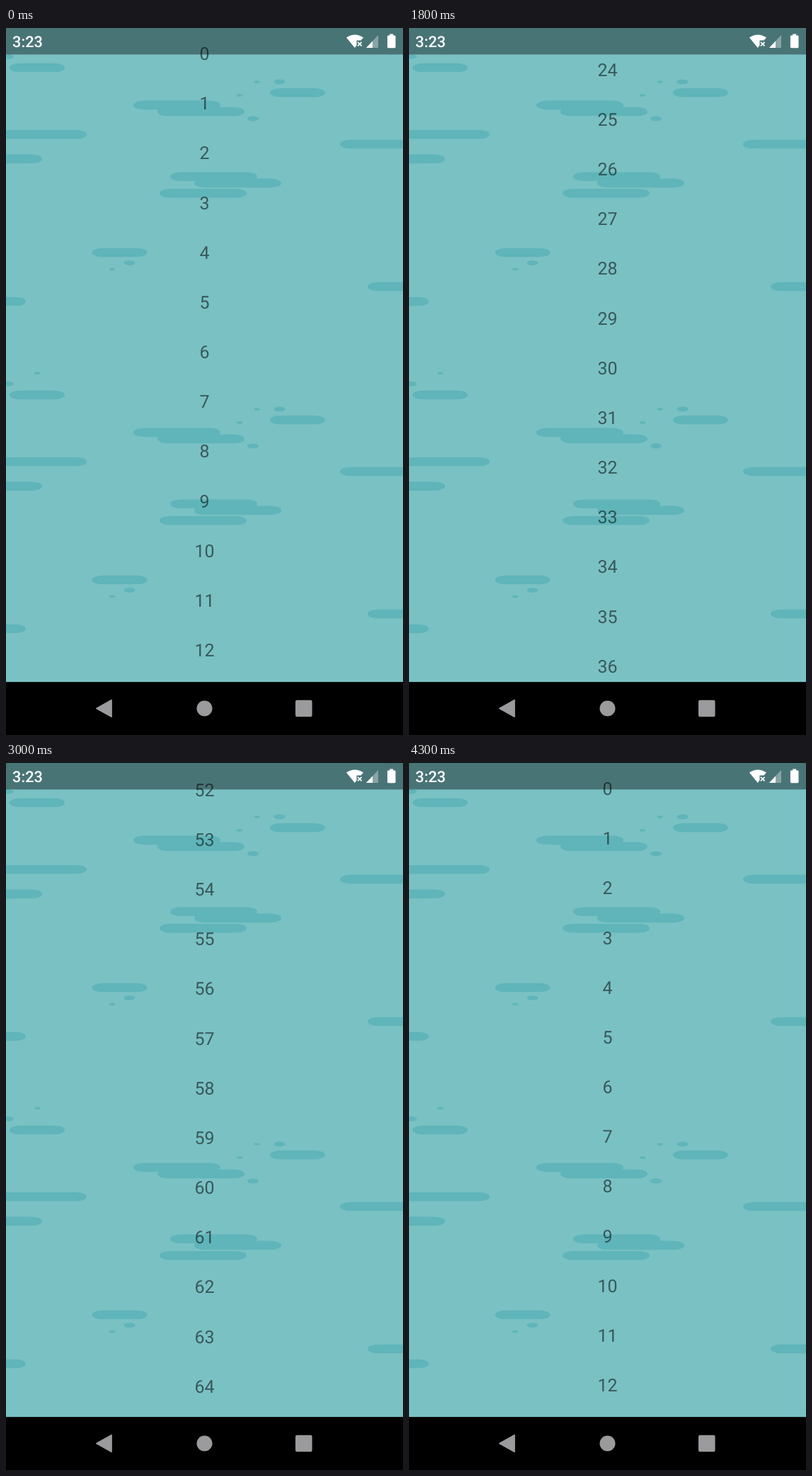
An HTML page for the animation above (4.6 s loop, 561 px wide and 998 px high).

```html
<!DOCTYPE html>
<html lang="en">
<head>
<meta charset="utf-8">
<title>Number list</title>
<style>
  html, body { margin: 0; width: 100%; height: 100%; overflow: hidden; background: #000; }
  svg { display: block; width: 100%; height: 100%; }
  text { font-family: Roboto, sans-serif; text-rendering: geometricPrecision; }
  #list { font-size: 25px; text-anchor: middle; fill: rgba(0, 0, 0, .54); }
</style>
</head>
<body>
<svg viewBox="0 0 561 998">
  <rect width="561" height="998" fill="#7ac1c4"/>
  <g id="tile" fill="#5fb5b9"></g>
  <use href="#tile" y="462"/>
  <g id="list"></g>

  <!-- status bar -->
  <rect width="561" height="37.4" fill="#000" opacity=".4"/>
  <g fill="#fff">
    <text x="9" y="27.3" font-size="21.8" font-weight="500">3:23</text>
    <path d="M481 13.5Q493 5.5 505 13.5L501.5 17.5H495.5V24.5L492.8 28Z"/>
    <path d="M497 19.8l5.6 5.6m0-5.6l-5.6 5.6" stroke="#fff" stroke-width="1.7"/>
    <path d="M526 10V28H509Z" opacity=".35"/>
    <path d="M518 18.5V28H509Z"/>
    <path d="M542.2 8.5h5v2h2q1.3 0 1.3 1.3v15q0 1.4-1.3 1.4h-9q-1.3 0-1.3-1.4v-15q0-1.3 1.3-1.3h2z"/>
  </g>

  <!-- navigation bar -->
  <rect y="923.15" width="561" height="75"/>
  <g fill="#9b9a9d">
    <path d="M128 960.5L149 948.8V972.2Z" stroke="#9b9a9d" stroke-width="1.8" stroke-linejoin="round"/>
    <circle cx="280.5" cy="960.5" r="11"/>
    <rect x="409" y="948.7" width="23.6" height="23.6" rx="2.2"/>
  </g>
</svg>
<script>
const WIDTH = 561, PITCH = 70.17, LOOP = 4600, STEP = 100;
const tile = document.getElementById('tile');
const list = document.getElementById('list');

function add(parent, tag, attrs) {
  const el = document.createElementNS('http://www.w3.org/2000/svg', tag);
  for (const key in attrs) el.setAttribute(key, attrs[key]);
  return parent.appendChild(el);
}

// A stack of streaks; each one also wraps to the left side, a little lower
function streaks(x, y, width, count = 1) {
  for (let i = 0; i < count; i++) {
    for (const side of [0, 1]) {
      add(tile, 'rect', {
        x: x + 34 * i - WIDTH * side, y: y + 9.1 * i + 21 * side - 6.3,
        width, height: 12.6, rx: 15, ry: 6.3
      });
    }
  }
}

const SHORT = 78, LONG = 123;
streaks(5, 56, SHORT);
streaks(373, 91.3, SHORT);
streaks(180, 108.9, LONG, 2);
streaks(-9, 150.3, LONG);
streaks(472, 164, LONG);
streaks(-27, 184.8, SHORT);
streaks(232, 209.8, LONG, 2);
streaks(217, 233.3, LONG);
streaks(121.5, 317, SHORT);
streaks(511, 365, SHORT);

// Each ripple has a smaller echo, which turns and drifts outwards from one to the next
[[174.5, 331.6], [386.5, 76], [349, 128], [3, 40.3]].forEach(([cx, cy], i) => {
  const angle = (160 + 20 * i * i) * Math.PI / 180, gap = 26 + 6 * i;
  add(tile, 'ellipse', { cx, cy, rx: 8, ry: 3.4 });
  add(tile, 'ellipse', {
    cx: cx + gap * Math.cos(angle), cy: cy + gap * Math.sin(angle), rx: 4.2, ry: 1.8
  });
});

for (let i = 0; i < 72; i++) {
  add(list, 'text', { x: WIDTH / 2, y: 45 + i * PITCH }).textContent = i;
}

// Touch-fling curve: time = .525x + .475x³ is solved for x, which then gives the distance
function fling(time, distance, duration) {
  const part = Math.min(1, Math.max(0, time / duration));
  const r = Math.sqrt(.525 / .475 / 3);
  const x = 2 * r * Math.sinh(Math.asinh(part / .475 / (2 * r ** 3)) / 3);
  return distance * (1.5 * x - .5 * x ** 3);
}

// Two flings down the list, then one back up to the top
function scrollAt(t) {
  if (t < 1000) return 0;
  if (t < 2500) return 76 + fling(t - 1000, 1651, 1125);
  if (t < 3200) return 1812 + fling(t - 2500, 2564, 1450);
  return Math.max(0, 3727 - fling(t - 3225, 4250, 1803));
}

const start = performance.now();
function draw() {
  const t = (performance.now() - start) % LOOP;
  const y = scrollAt(Math.floor(t / STEP) * STEP);
  list.setAttribute('transform', `translate(0 ${-y})`);
  requestAnimationFrame(draw);
}
draw();
</script>
</body>
</html>
```
